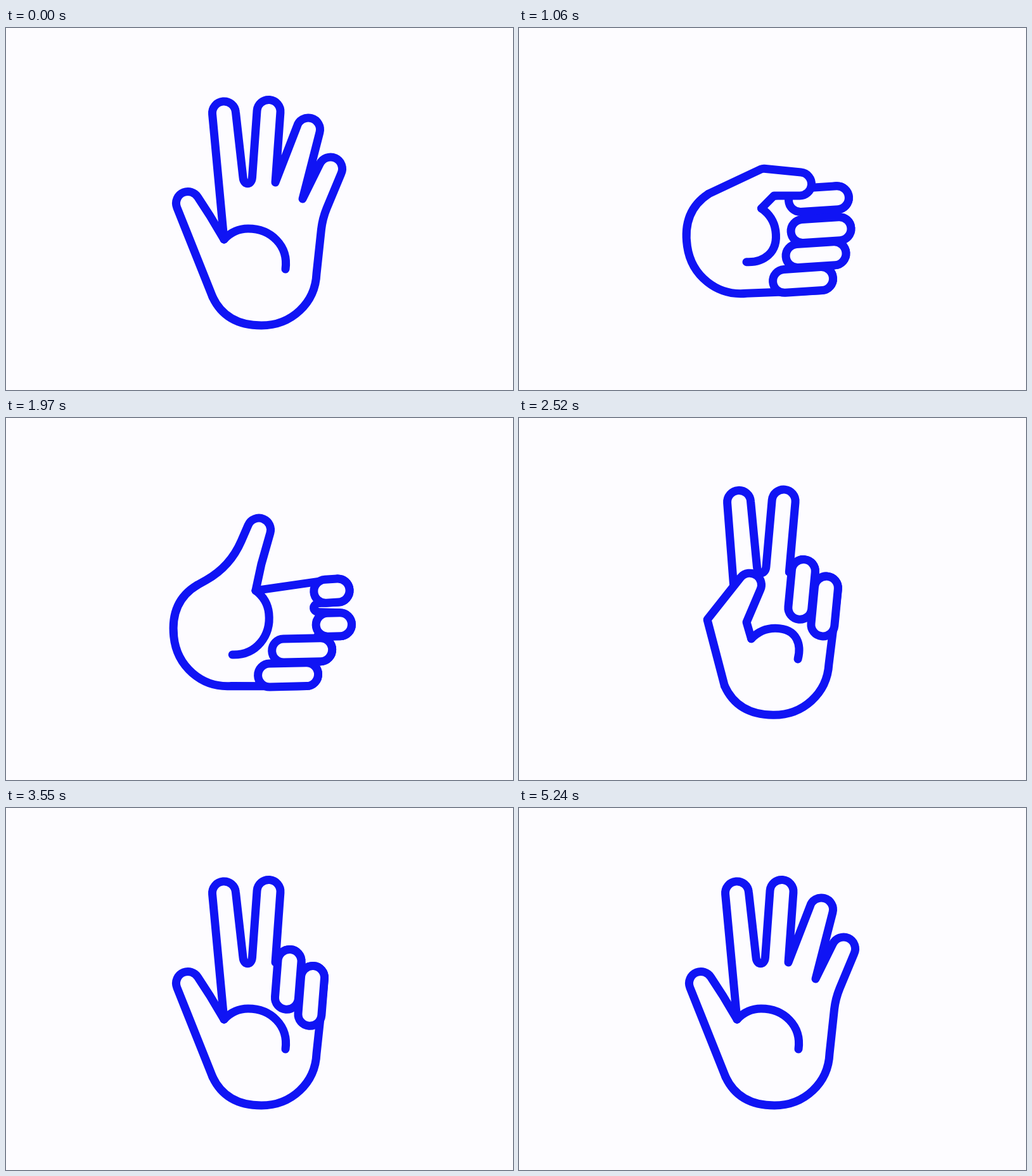
Write an HTML page with a canvas that moves like this. It is 800x572 px and loops after 5.27 s.

```html
<!DOCTYPE html>
<html lang="en">
<head>
<meta charset="utf-8">
<title>Counting hand</title>
<style>
  html, body { margin: 0; width: 100%; height: 100%; overflow: hidden; background: #fdfcff; }
  canvas { display: block; }
</style>
</head>
<body>
<canvas id="stage" width="800" height="572"></canvas>
<script>
const ctx = document.getElementById('stage').getContext('2d');
const LOOP = 5270, PAPER = '#fdfcff', INK = '#1014f4';
const R = 18.5;                 // radius of every fingertip
const FOLD = 58;                // length of a folded fingertip
const PIVOT = { x: 441, y: 381 };
const at = (x, y) => ({ x, y });
const rad = deg => deg * Math.PI / 180;
const mix = (a, b, p) => a + (b - a) * p;

const fingers = [
  { knuckle: at(361, 225), tip: at(344, 134.5) },
  { knuckle: at(410, 228.5), tip: at(414.5, 132) },
  { knuckle: at(447.5, 242), tip: at(477, 160.5) },
  { knuckle: at(484, 268), tip: at(512, 222.5) }
];
const thumb = {
  curled: { knuckle: at(297, 321), tip: at(363, 265), bend: at(359, 324), root: at(367, 350) },
  spread: { knuckle: at(285, 322), tip: at(287, 277), bend: at(322, 297), root: at(344, 334) },
  raised: { knuckle: at(302, 370), tip: at(249, 319), bend: at(304, 321), root: at(344, 334) }
};

// 0 before the start, 1 after the end, eased in and out between.
function ramp(t, start, end) {
  const x = Math.min(1, Math.max(0, (t - start) / (end - start)));
  return (1 - Math.cos(Math.PI * x)) / 2;
}

// A ramp that swings past its end and settles.
function swing(t, start, end, over) {
  const u = Math.max(0, (t - end) / (end - start));
  return ramp(t, start, end) * (1 + over * Math.exp(-2 * u * u) * Math.cos(4 * u));
}

function poseAt(t) {
  const fist = ramp(t, 110, 420);
  return {
    lift: fist - ramp(t, 640, 1200),
    turn: ramp(t, 590, 1120) - swing(t, 1960, 2300, 0.03),
    front: 1 - fist + ramp(t, 1800, 2350),
    back: 1 - fist + ramp(t, 3600, 3880),
    spread: 1 - fist + swing(t, 2860, 3080, 0.03) - ramp(t, 3600, 3840) + swing(t, 4430, 4670, 0.03),
    raised: swing(t, 960, 1260, 0.1) - ramp(t, 1980, 2250)
  };
}

// Straight fingers fan out by ten degrees each; folded ones lie parallel.
function poseFinger({ knuckle, tip }, i, p) {
  return {
    x: mix(knuckle.x, tip.x, p),
    y: mix(knuckle.y, tip.y, p),
    tilt: rad(mix(4.5, 10 * i - 5, p)),
    fold: FOLD * (1 - p / 0.33)
  };
}

function paint() {
  ctx.fill();
  ctx.stroke();
}

function cap(f) {
  ctx.arc(f.x, f.y, R, f.tilt + Math.PI, f.tilt + 2 * Math.PI);
}

function drawBody([index, middle, ring, little], back) {
  ctx.beginPath();
  ctx.moveTo(344, 334);
  cap(index);
  ctx.lineTo(374, 236);
  ctx.bezierCurveTo(375, 249, 387.5, 249, 388.5, 236);
  cap(middle);
  ctx.lineTo(425, 244);
  cap(ring);
  ctx.lineTo(468, 270);
  cap(little);
  ctx.lineTo(mix(501, 506, back), 285);
  ctx.quadraticCurveTo(499.5, 301, 497.5, 318);
  ctx.lineTo(490, 388);
  ctx.bezierCurveTo(488, 435, 450, 470, 403, 470);
  ctx.bezierCurveTo(365, 470, 340, 455, 326, 425);
  paint();
}

function drawFold(f) {
  if (f.fold <= 0) return;
  ctx.beginPath();
  cap(f);
  ctx.arc(f.x - f.fold * Math.sin(f.tilt), f.y + f.fold * Math.cos(f.tilt), R, f.tilt, f.tilt + Math.PI);
  ctx.closePath();
  paint();
}

// Angle on the circle around c where a line from p touches it.
function tangent(c, p, side) {
  const dx = p.x - c.x, dy = p.y - c.y;
  return Math.atan2(dy, dx) + side * Math.acos(Math.min(1, R / Math.hypot(dx, dy)));
}

function drawThumb({ spread, raised }) {
  const blend = (part, axis) => {
    const base = thumb.curled[part][axis];
    return base + spread * (thumb.spread[part][axis] - base) + raised * (thumb.raised[part][axis] - base);
  };
  const [knuckle, tip, bend, root] = ['knuckle', 'tip', 'bend', 'root'].map(
    part => at(blend(part, 'x'), blend(part, 'y')));
  const from = tangent(tip, knuckle, 1), to = tangent(tip, bend, -1);
  ctx.beginPath();
  ctx.moveTo(326, 425);
  ctx.arcTo(knuckle.x, knuckle.y, tip.x + R * Math.cos(from), tip.y + R * Math.sin(from), 130 * raised * raised);
  ctx.arc(tip.x, tip.y, R, from, to);
  ctx.lineTo(bend.x, bend.y);
  ctx.lineTo(root.x, root.y);
  paint();

  const top = at(root.x + 38, root.y - 17);
  ctx.beginPath();
  ctx.moveTo(root.x, root.y);
  ctx.quadraticCurveTo(top.x - 22, top.y, top.x, top.y);
  ctx.bezierCurveTo(top.x + 36, top.y, 446, top.y + 27, PIVOT.x, PIVOT.y);
  ctx.stroke();
}

function draw(t) {
  const pose = poseAt(t);
  const tips = fingers.map((f, i) => poseFinger(f, i, i < 2 ? pose.front : pose.back));

  ctx.resetTransform();
  ctx.fillStyle = PAPER;
  ctx.fillRect(0, 0, 800, 572);
  ctx.translate(PIVOT.x - 4 * pose.lift - 84 * pose.turn, PIVOT.y - 31 * pose.lift - 7 * pose.turn);
  ctx.rotate(rad(84.3 * pose.turn));
  ctx.translate(-PIVOT.x, -PIVOT.y);
  ctx.strokeStyle = INK;
  ctx.lineWidth = 13;
  ctx.lineCap = ctx.lineJoin = 'round';

  drawBody(tips, pose.back);
  tips.forEach(drawFold);
  drawThumb(pose);
}

const start = performance.now();
function tick() {
  draw((performance.now() - start) % LOOP);
  requestAnimationFrame(tick);
}
tick();
</script>
</body>
</html>
```
